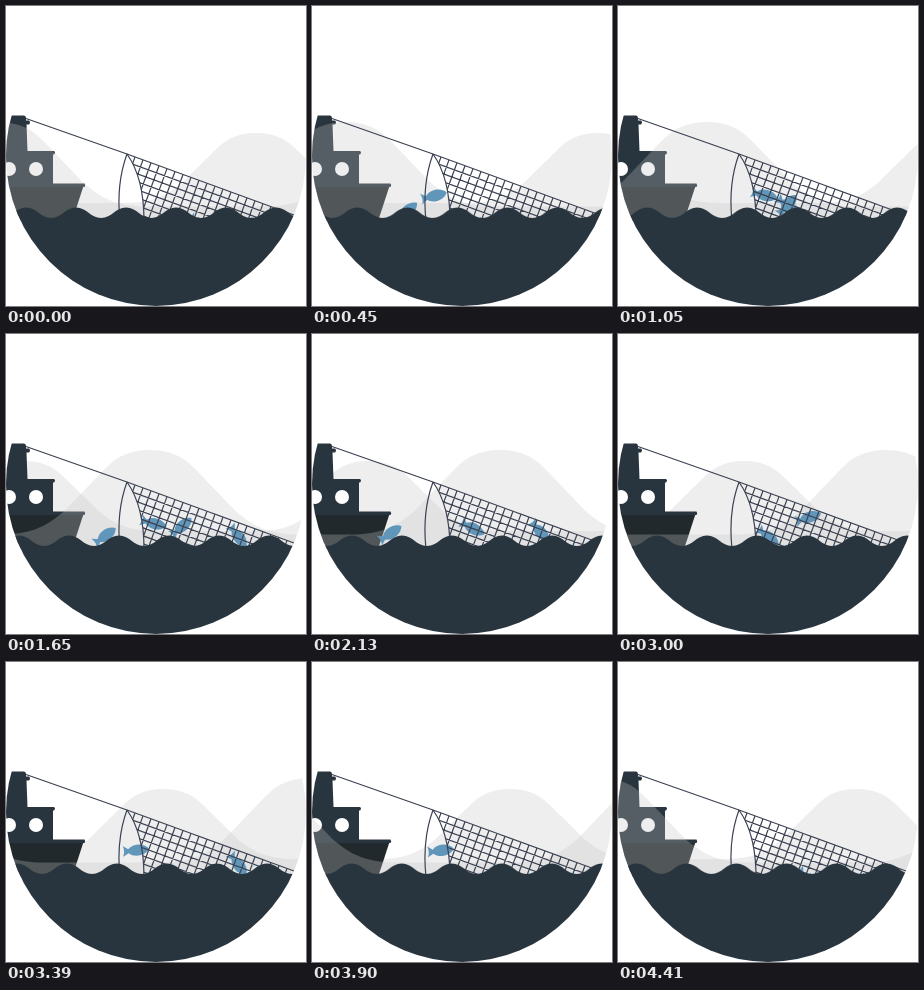
These frames come from a looping animation (300 by 300 pixels, 4440 ms). An HTML page:

```html
<!DOCTYPE html>
<html lang="en">
<head>
<meta charset="utf-8">
<title>Fishing boat</title>
<style>
  html, body { margin: 0; width: 100%; height: 100%; overflow: hidden; background: #fff; }
  svg { display: block; width: 100vw; height: 100vh; }
  .hill { fill: #c4c4c4; fill-opacity: .29; animation: drift 4.44s linear infinite; }
  .big { --from: -8px; --to: 400.5px; }
  .small { --from: 250px; --to: 605px; }
  #sea { fill: #28353e; animation: roll .888s linear infinite; }
  .fish { fill: #6096ba; offset-rotate: auto; animation: leap 4.44s linear infinite both; }
  .first { offset-path: path("M52 225Q112 151 172 225"); }
  .near { offset-path: path("M76 225Q136 151 196 225"); }
  .far { offset-path: path("M152 225Q199.5 139 247 225"); }
  @keyframes drift {
    from { transform: translateX(var(--from)); }
    to { transform: translateX(var(--to)); }
  }
  @keyframes roll { to { transform: translateX(50px); } }
  @keyframes leap {
    0% { offset-distance: 0%; }
    24%, 100% { offset-distance: 100%; }
  }
</style>
</head>
<body>
<svg viewBox="0 0 300 300">
  <defs>
    <clipPath id="disc"><circle cx="150" cy="150" r="150"/></clipPath>
    <clipPath id="mesh"><path d="M121 148Q138 172 138 215H288V209Z"/></clipPath>
  </defs>
  <g clip-path="url(#disc)">
    <g class="hill small"><path class="ridge" data-top="127" data-base="197" data-period="364"/></g>
    <g fill="#28353e">
      <path d="M0 109.5H18Q20 109.5 20 112V114.5H23Q25 116.5 23 118.5H20.5L21.5 145H48Q50 146.500 48 148.500H47V180H0Z"/>
      <path fill="#22292c" d="M0 180H77.500L70 203L66 215H0Z"/>
      <path d="M0 177.500H78.500Q80 179 78.500 181H0Z"/>
    </g>
    <g fill="#fff"><circle cx="3" cy="163" r="7"/><circle cx="30" cy="163" r="7"/></g>
    <g class="hill big"><path class="ridge" data-top="116" data-base="200.5" data-period="416"/></g>
    <g id="shoal"></g>
    <g fill="none" stroke="#3a4150" stroke-width="1.2">
      <path id="grid" clip-path="url(#mesh)"/>
      <path d="M20 112.500L121 148L288 209"/>
      <path d="M121 148Q110 178 114 215M121 148Q138 172 138 215"/>
    </g>
    <path id="sea"/>
  </g>
</svg>
<script>
  const $ = s => document.querySelector(s);

  // Flat-topped humps one period apart, joined by level valleys.
  function ridge(top, base, period) {
    const scale = period / 416;
    let d = `M${-3 * period} ${base}`;
    for (let k = -2; k <= 1; k++) {
      const p = (dx, dy) => `${k * period + dx * scale} ${top + dy / 81 * (base - top)} `;
      d += `L${p(-150, 81)}C${p(-122, 81)}${p(-105, 75)}${p(-85, 58)}L${p(-45, 18)}`
         + `C${p(-33, 6)}${p(-20, 0)}${p(0, 0)}S${p(33, 6)}${p(45, 18)}`
         + `L${p(85, 58)}C${p(105, 75)}${p(122, 81)}${p(150, 81)}`;
    }
    return d + `V240H${-3 * period}Z`;
  }
  for (const el of document.querySelectorAll(".ridge")) {
    const { top, base, period } = el.dataset;
    el.setAttribute("d", ridge(+top, +base, +period));
  }

  $("#sea").setAttribute("d",
    "M-80 201.5" + "c11 0 14 10.5 25 10.5s14-10.5 25-10.5".repeat(9) + "V310H-80Z");

  // Net lines follow the tow rope and cross it at right angles.
  const SLOPE = .365, MESH = 8;
  let grid = "";
  for (let s = MESH; s < 240; s += MESH) {
    grid += `M121 ${148 + s}l200 ${200 * SLOPE}`;
    grid += `M${121 + s} ${148 + s * SLOPE}l${-100 * SLOPE} 100`;
  }
  $("#grid").setAttribute("d", grid);

  const FISH = "M13 0C9-6-2-8-8-2L-13-6Q-11 0-14 5L-8 2C-3 7 8 7 13 0Z";
  const leaps = {
    first: [1.86, 2.16],
    near: [.02, .25, .44, 1.03, 1.41, 2.9, 3.42],
    far: [.8, 1.33, 2.54]
  };
  for (const [lane, starts] of Object.entries(leaps))
    for (const s of starts) {
      const el = document.createElementNS("http://www.w3.org/2000/svg", "path");
      el.setAttribute("class", "fish " + lane);
      el.setAttribute("d", FISH);
      el.style.animationDelay = s - 4.44 + "s";
      $("#shoal").append(el);
    }
</script>
</body>
</html>
```
